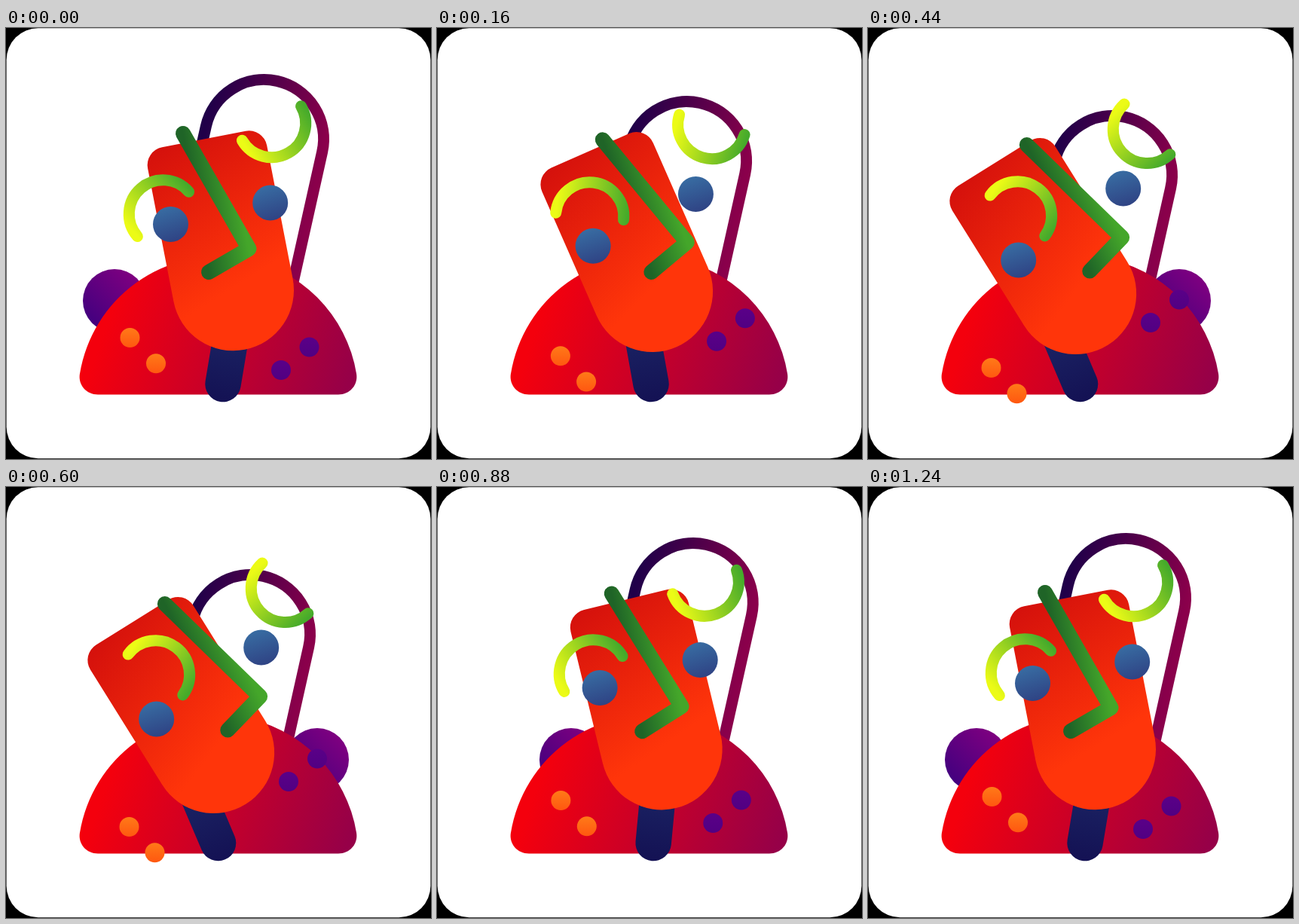
An HTML page with a canvas for the animation above (1280 ms loop, 564 by 572 pixels).

```html
<!DOCTYPE html>
<html lang="en">
<head>
<meta charset="utf-8">
<title>Nodding abstract figure</title>
<style>
  html, body { margin: 0; width: 100%; height: 100%; overflow: hidden; background: #000; }
  canvas { display: block; }
</style>
</head>
<body>
<canvas id="stage" width="564" height="572"></canvas>
<script>
const ctx = document.getElementById('stage').getContext('2d');
const LOOP = 1280, STEP = 40;
const TAU = Math.PI * 2;

const clamp = x => Math.min(1, Math.max(0, x));
const ease = x => { x = clamp(x); return x * x * (3 - 2 * x); };
const mix = (a, b, p) => a + (b - a) * p;
const rad = deg => deg * Math.PI / 180;

// 0 = upright, 1 = fully tilted
const tilt = t => ease(t / 280) - ease((t - 600) / 360);

function gradient(x0, y0, x1, y1, ...colors) {
  const g = ctx.createLinearGradient(x0, y0, x1, y1);
  colors.forEach((c, i) => g.addColorStop(i / (colors.length - 1), c));
  return g;
}

function at(x, y, deg, draw) {
  ctx.save();
  ctx.translate(x, y);
  ctx.rotate(rad(deg));
  ctx.beginPath();
  draw();
  ctx.restore();
}

function stroke(style, width) {
  ctx.strokeStyle = style;
  ctx.lineWidth = width;
  ctx.lineCap = ctx.lineJoin = 'round';
  ctx.stroke();
}

function fill(style) {
  ctx.fillStyle = style;
  ctx.fill();
}

// Disc sliding from one place to another; the gradient runs along (gx, gy).
function disc(from, to, r, gx, gy, c0, c1, p) {
  at(mix(from[0], to[0], p), mix(from[1], to[1], p), 0, () => {
    ctx.arc(0, 0, r, 0, TAU);
    fill(gradient(-gx * r, -gy * r, gx * r, gy * r, c0, c1));
  });
}

function card() {
  ctx.fillStyle = '#000';
  ctx.fillRect(0, 0, 564, 572);
  ctx.beginPath();
  ctx.roundRect(0.6, 0.3, 562.8, 571, 42);
  fill('#fff');
}

function arch(p) {
  at(mix(342.5, 324.5, p), mix(147.5, 195.5, p), 12.6, () => {
    ctx.moveTo(-79, 40);
    ctx.lineTo(-79, 0);
    ctx.arc(0, 0, 79, Math.PI, TAU);
    ctx.lineTo(79, 200);
    stroke(gradient(-80, 0, 80, 0, '#200049', '#8a004b'), 15);
  });
}

function body() {
  at(281.5, 489, 0, () => {
    ctx.moveTo(-159.5, -2.5);
    ctx.bezierCurveTo(-174.5, -2.5, -186, -15, -183.6, -30);
    const a = Math.atan2(30, 183.6);
    ctx.arc(0, 0, 186, Math.PI + a, TAU - a);
    ctx.bezierCurveTo(186, -15, 174.5, -2.5, 159.5, -2.5);
    ctx.closePath();
    fill(gradient(-145, -105, 165, 5, '#f4000d', '#960048'));
  });
}

function spots(p) {
  const orange = ['#ff7a18', '#ff5710'], violet = ['#5a0088', '#510082'];
  disc([164.5, 411], [163.5, 451], 13, 0, 1, ...orange, p);
  disc([199, 445.3], [197.5, 485.3], 13, 0, 1, ...orange, p);
  disc([402.5, 423.5], [413, 360.5], 13, 0, 1, ...violet, p);
  disc([365, 454], [375, 391], 13, 0, 1, ...violet, p);
}

function neck(p) {
  at(mix(288, 281.5, p), 472.5, mix(9.5, -23, p), () => {
    ctx.moveTo(0, 0);
    ctx.lineTo(0, -80);
    stroke(gradient(0, 20, 0, -60, '#141254', '#1a2162'), 47.5);
  });
}

function head(p) {
  const r = 80.5, top = -204, corner = 24;
  at(301.5, 420, -21 * p, () => {
    ctx.translate(0, -72.2);
    ctx.rotate(rad(-11));
    ctx.moveTo(-r, 0);
    ctx.arcTo(-r, top, 0, top, corner);
    ctx.arcTo(r, top, r, 0, corner);
    ctx.lineTo(r, 0);
    ctx.arc(0, 0, r, 0, Math.PI);
    fill(gradient(-55, -205, 20, -10, '#d5110c', '#ff350a'));
  });
}

function eyes(p) {
  const blue = ['#386ca2', '#2f4384'];
  disc([218.5, 260.5], [199.7, 308], 23.5, 0.3, 0.95, ...blue, p);
  disc([350.7, 232], [338.7, 213], 23.5, 0.3, 0.95, ...blue, p);
}

function nose(p) {
  at(276.5, 233.5, -16 * p, () => {
    ctx.moveTo(-41.5, -93.5);
    ctx.lineTo(46, 59.5);
    ctx.lineTo(-7.5, 90.5);
    stroke(gradient(-41.5, -93.5, 15.5, -104, '#1f6427', '#44a62a'), 20);
  });
}

function brow(x, y, deg, cx, cy, start) {
  at(x, y, deg, () => {
    ctx.arc(cx, cy, 45.2, start, start + Math.PI);
    stroke(gradient(cx - 45, 0, cx + 50, 0, '#ecfb16', '#45aa2b'), 15);
  });
}

function render(t) {
  const p = tilt(t);
  card();
  disc([144, 362], [413, 362], 42, 0.7, -0.7, '#44007f', '#7e0080', p);
  arch(p);
  body();
  spots(p);
  neck(p);
  head(p);
  eyes(p);
  nose(p);
  brow(202.2, 241.7, mix(-41, 36.5, p), 1.3, 8.1, Math.PI);
  brow(356.6, 141.6, mix(-30.2, 47.7, p), 4, -15.1, 0);
}

function tick() {
  const t = performance.now() % LOOP;
  render(Math.floor(t / STEP) * STEP);
  requestAnimationFrame(tick);
}
tick();
</script>
</body>
</html>
```
